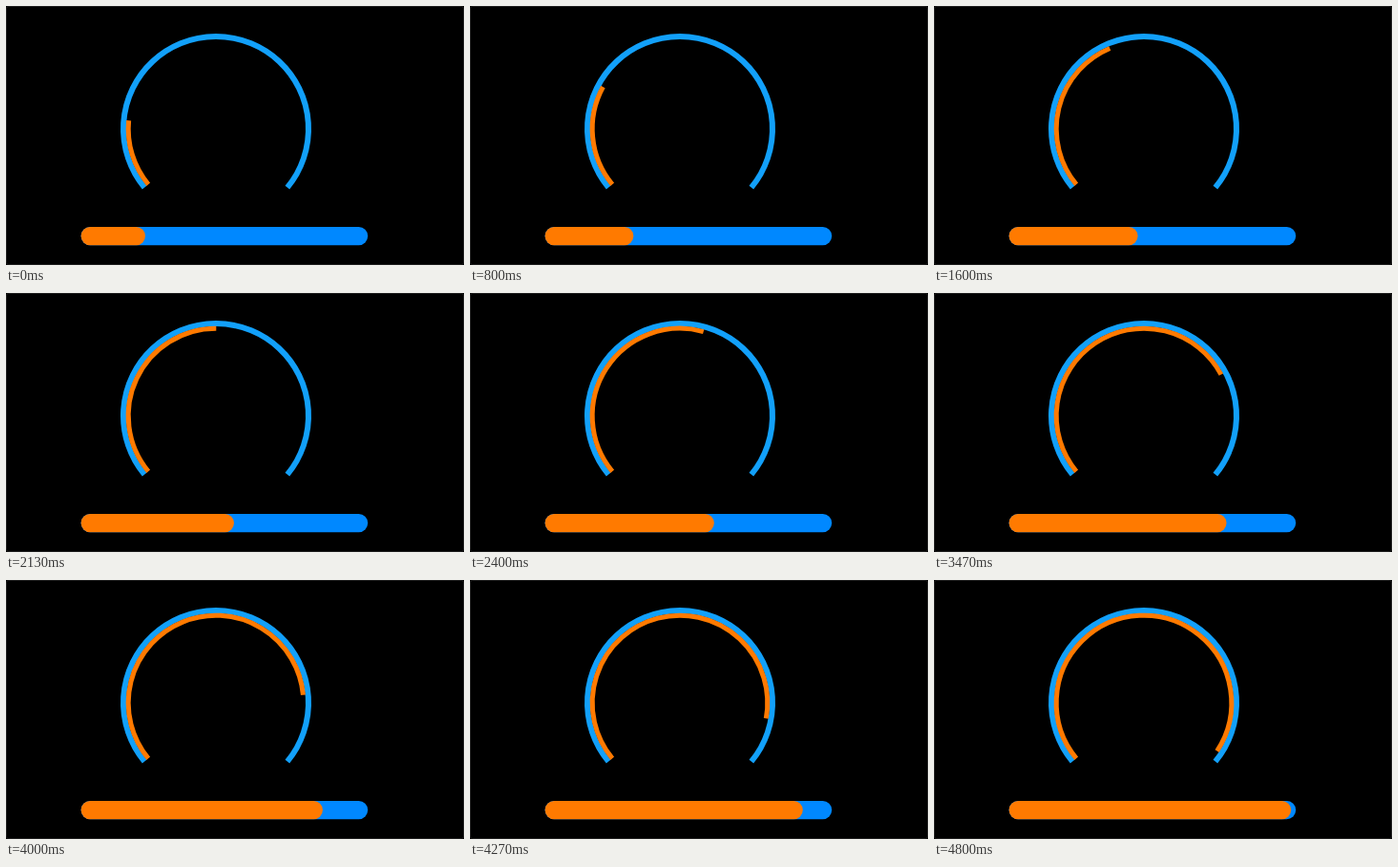
Recreate the animation shown at these times as an HTML page. Size 480 by 272 pixels, loop 5070 ms.

```html
<!DOCTYPE html>
<html lang="en">
<head>
<meta charset="utf-8">
<title>Progress gauge</title>
<style>
  html, body { margin: 0; width: 100%; height: 100%; overflow: hidden; background: #000; }
  svg { display: block; width: 100vw; height: 100vh; }
</style>
</head>
<body>
<svg viewBox="0 0 480 272">
  <rect width="480" height="272" fill="#000"/>
  <rect x=".5" y=".5" width="479" height="271" rx="2" fill="none" stroke="#1c1c1c"/>
  <path id="track" fill="none" stroke="#12a0fa" stroke-width="6"/>
  <path id="dial" fill="none" stroke="#ff7a00" stroke-width="5"/>
  <rect x="78.6" y="232" width="300.6" height="19.2" rx="9.6" fill="#0088ff"/>
  <rect id="bar" x="78.6" y="232" height="19.2" rx="9.6" fill="#ff7a00"/>
</svg>
<script>
const LOOP = 5070, CX = 220, CY = 129, START = 140.5;
const el = id => document.getElementById(id);

function point(r, deg) {
  const a = deg * Math.PI / 180;
  return (CX + r * Math.cos(a)).toFixed(2) + ' ' + (CY + r * Math.sin(a)).toFixed(2);
}

function arc(r, sweep) {
  const large = sweep > 180 ? 1 : 0;
  return `M${point(r, START)}A${r} ${r} 0 ${large} 1 ${point(r, START + sweep)}`;
}

// Progress moves in whole units, with a slower start.
function unitsAt(t) {
  const step = Math.min(18, Math.floor((Math.floor(t / 10) + 0.5) * 3 / 80));
  return step < 3 ? 8 + step : Math.floor(11.65 + 1.6 * (step - 3));
}

function draw(t) {
  const units = unitsAt(t);
  el('dial').setAttribute('d', arc(91.8, 45 + 7.7 * (units - 8)));
  el('bar').setAttribute('width', (8.45 * units - 0.2).toFixed(2));
}

function frame() {
  draw(performance.now() % LOOP);
  requestAnimationFrame(frame);
}

el('track').setAttribute('d', arc(97, 259));
draw(0);
requestAnimationFrame(frame);
</script>
</body>
</html>
```
